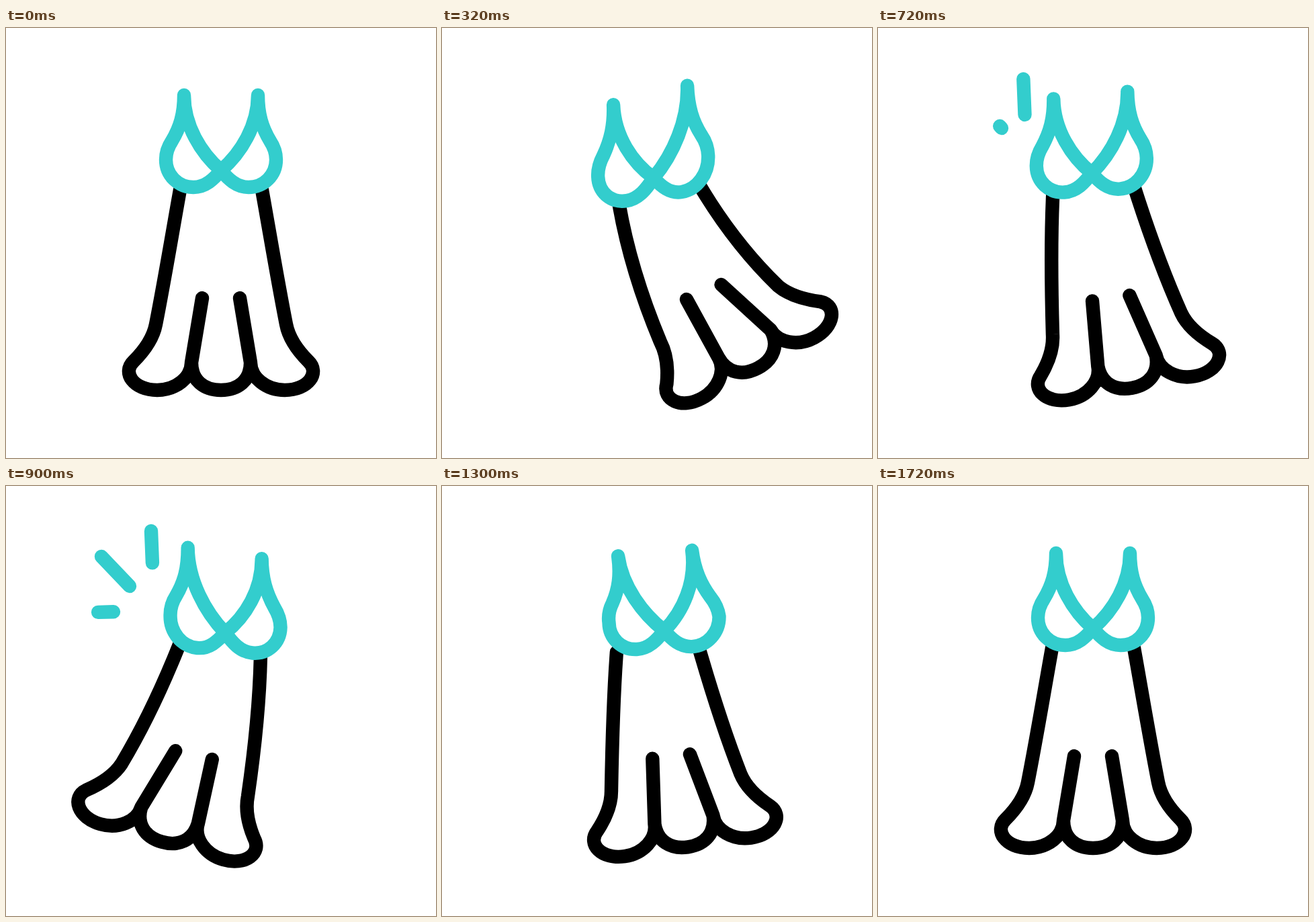
These frames come from a looping animation (640x640 px, 2.4 s). An HTML page:

```html
<!DOCTYPE html>
<html lang="en">
<head>
<meta charset="utf-8">
<title>Swinging dress</title>
<style>
html, body { margin: 0; width: 100%; height: 100%; overflow: hidden; background: #fff; }
svg { display: block; width: 100%; height: 100%; }
path { fill: none; stroke-width: 20.4; stroke-linecap: round; stroke-linejoin: round; }
</style>
</head>
<body>
<svg viewBox="0 0 640 640">
  <path id="skirt" stroke="#000"/>
  <path id="bodice" stroke="#33cdcd"/>
  <path id="rays" stroke="#33cdcd"/>
</svg>
<script>
const LOOP = 2400, CX = 320, CY = 212;

// Left halves at rest; the right halves are mirrored
const SKIRT = `M259,241 C247,308 236,375 223,441 C219,462 204,482 190,496
  C172,513 190,539 225,539 C253,539 276,520 276,498
  L292,402 M276,498 C276,524 294,539 320,539`;
const BODICE = `M265,100 C265,128 259,148 247,168 C241,177 238,186 238,196
  C238,219 256,237 279,237 C297,237 309,225 320,212 C350,186 375,145 375,100`;

const SWING = [[0, 0], [490, 38.6], [955, -18], [1345, 9.2], [1720, 0]];
const SLIDE = [[800, 0], [1140, 16], [1640, 0]];

const RAYS = [
  { from: [218.5, 129], to: [216, 67], start: 580 },
  { from: [184, 149], to: [142, 105], start: 710 },
  { from: [160, 187.3], to: [98, 188.8], start: 840 }
];

const clamp = v => Math.min(1, Math.max(0, v));
const mix = (a, b, k) => a.map((v, i) => v + (b[i] - v) * k);
const rad = deg => deg * Math.PI / 180;

// Sine easing from key to key
function track(keys, t) {
  let value = keys[0][1];
  for (let i = 1; i < keys.length; i++) {
    const [t0, v0] = keys[i - 1], [t1, v1] = keys[i];
    if (t >= t0) value = v0 + (v1 - v0) * (1 - Math.cos(Math.PI * clamp((t - t0) / (t1 - t0)))) / 2;
  }
  return value;
}

// The skirt turns about the bust, half as far at the waist as at the hem
const bendSkirt = swing => (x, y) => {
  const a = rad(swing * (0.5 + 0.5 * clamp((y - 235) / 265)));
  const u = x - CX, v = y - CY, sin = Math.sin(a), cos = Math.cos(a);
  return [
    CX - 0.17 * swing + u * cos + v * sin,
    CY + 0.22 * Math.abs(swing) - u * sin + v * cos
  ];
};

// The bodice tilts and sags, while its cups slide sideways
const bendBodice = (swing, slide) => (x, y) => {
  const drop = y - 100, u = x - CX;
  const tilt = rad(swing * (0.53 - 0.0015 * drop));
  return [
    x - swing * (0.35 - 0.0015 * drop) + slide * clamp(drop / 96),
    y - u * Math.sin(tilt) + 0.0035 * Math.abs(swing) * drop
  ];
};

function trace(half, bend) {
  const draw = place => half.replace(/(\d+),(\d+)/g, (_, x, y) => bend(place(+x), +y));
  return draw(x => x) + draw(x => 2 * CX - x);
}

// Each ray grows outwards, then empties from its inner end
function drawRay({ from, to, start }, t) {
  const head = clamp((t - start) / 165), tail = clamp((t - start - 288) / 140);
  return head > tail ? `M${mix(from, to, tail)}L${mix(from, to, head)}` : "";
}

const setPath = (id, d) => document.getElementById(id).setAttribute("d", d);

function frame() {
  const t = performance.now() % LOOP, swing = track(SWING, t);
  setPath("skirt", trace(SKIRT, bendSkirt(swing)));
  setPath("bodice", trace(BODICE, bendBodice(swing, track(SLIDE, t))));
  setPath("rays", RAYS.map(ray => drawRay(ray, t)).join(""));
  requestAnimationFrame(frame);
}
frame();
</script>
</body>
</html>
```
